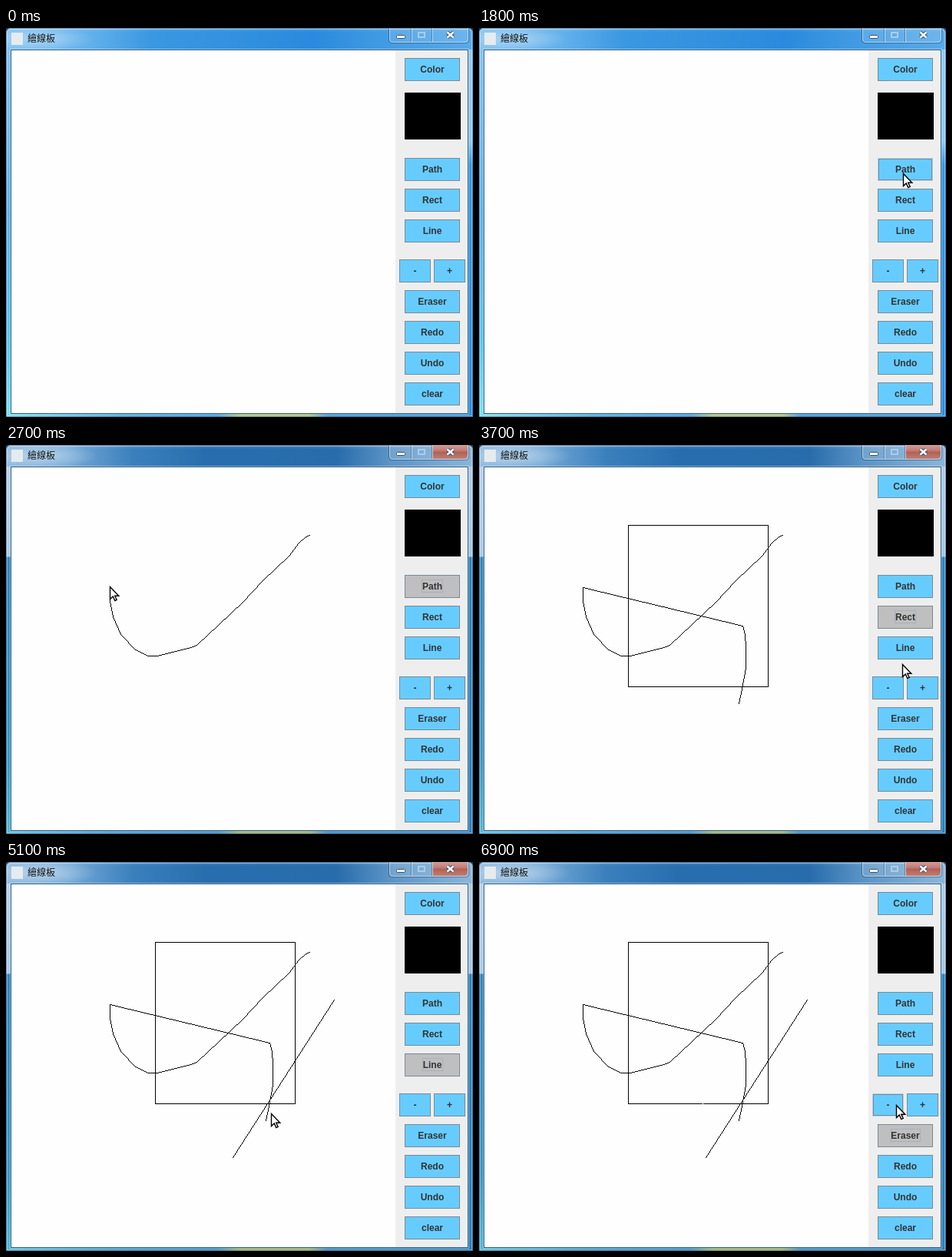
Write an HTML page with a canvas that moves like this. It is 608 px wide and 506 px high and loops after 7000 ms.

```html
<!DOCTYPE html>
<html lang="zh-Hant">
<head>
<meta charset="utf-8">
<title>Drawing board</title>
<style>
html, body { margin: 0; width: 100%; height: 100%; overflow: hidden; background: #16324d; }
#win { position: absolute; left: 0; top: 0; width: 608px; height: 506px; overflow: hidden; border-radius: 6px 6px 0 0; }
#win div { position: absolute; }
.title { left: 0; top: 0; width: 608px; height: 28px;
  background: radial-gradient(ellipse 70px 16px at 45px 14px, rgba(255,255,255,.4), transparent),
    linear-gradient(rgba(255,255,255,.2), transparent 5px),
    linear-gradient(90deg, #83c3f0, #62b0eb 110px, #3a97e1 190px, #2b8add 400px, #3f99e2 480px, #58aaea); }
.left { left: 0; top: 28px; width: 6px; height: 478px;
  background: linear-gradient(#7fc3f0, #5cb3ec 45%, #56c8ee 80%, #78e2f2); }
.right { left: 602px; top: 28px; width: 6px; height: 478px;
  background: linear-gradient(#8fcaf3, #8ac8f3 120px, #3397e2 150px, #2a8ee0); }
.foot { left: 0; top: 502px; width: 608px; height: 4px;
  background: linear-gradient(90deg, #74ddf0, #3aa5e2 150px, #2f97dd 275px, #a3bd73 305px, #a3bd73 395px, #2c8fd8 418px, #2c8fd8); }
.on .title {
  background: radial-gradient(ellipse 75px 17px at 45px 14px, rgba(255,255,255,.45), transparent),
    linear-gradient(rgba(255,255,255,.2), transparent 5px),
    linear-gradient(90deg, #8db9df, #76aad7 80px, #3b80bd 165px, #286eae 260px, #286cab 430px, #5b94c6 500px, #8bb6da); }
.on .left { background: linear-gradient(#b5d3ec, #a5cbe8 117px, #2f86c0 118px, #3797c8 80%, #50b9d6); }
.on .right { background: linear-gradient(#a9cce9, #9fc6e6 117px, #2d83bf 118px, #2b7fbd); }
.on .foot { background: linear-gradient(90deg, #50b9d6, #3291c4 150px, #2b82bd 275px, #8fa866 305px, #8fa866 395px, #2a7cb8 418px, #2a7cb8); }
svg, canvas { position: absolute; left: 0; top: 0; }
text { font: bold 12px "Liberation Sans", Arial, sans-serif; fill: #333; text-anchor: middle; }
.name { font: 12px "Noto Sans CJK TC", "Noto Sans CJK", sans-serif; fill: #111; text-anchor: start; }
.crisp { shape-rendering: crispEdges; }
.edge { fill: none; stroke: rgba(20,55,90,.4); }
.shine { fill: none; stroke: rgba(255,255,255,.4); }
.face { fill: #66ccff; stroke: #7a8a99; }
.inner, .focus { fill: none; visibility: hidden; }
.inner { stroke: #7a8a99; }
.focus { stroke: #a9b0bb; }
.hover .face { stroke: #b8cfe5; }
.hover .inner, .picked .focus { visibility: visible; }
.picked .face { fill: #bfbfbf; }
.cap { fill: rgba(255,255,255,.13); stroke: rgba(225,243,255,.65); }
.rim { fill: none; stroke: rgba(20,50,80,.45); }
.close { fill: none; }
.on .close { fill: url(#red); }
</style>
</head>
<body>
<div id="win">
  <div class="title"></div><div class="left"></div><div class="right"></div><div class="foot"></div>
  <svg width="608" height="506" viewBox="0 0 608 506">
    <linearGradient id="red" x2="0" y2="1">
      <stop stop-color="#c98f8a"/><stop offset=".45" stop-color="#b9625a"/>
      <stop offset=".5" stop-color="#a5473f"/><stop offset="1" stop-color="#bb6a58"/>
    </linearGradient>
    <path class="edge" d="M.5 506V6.5Q.5 .5 6.5 .5H601.5Q607.5 .5 607.5 6.5V505.5H0"/>
    <path class="shine" d="M1.5 504.5V7Q1.5 1.5 7 1.5H601Q606.5 1.5 606.5 7V504.5Z"/>
    <rect class="shine crisp" x="5.5" y="27.5" width="597" height="475"/>
    <rect x="7" y="6" width="15" height="16" fill="#e6ebee"/>
    <text class="name" x="28" y="18">繪線板</text>
    <path class="close" d="M555 0H601V14Q601 18 597 18H555Z"/>
    <path class="rim" d="M498.5 0V15Q498.5 19.5 503 19.5H598Q602.5 19.5 602.5 15V0M527.5 0V18M554.5 0V18"/>
    <path class="cap" d="M499.5 0V14Q499.5 18.5 503.5 18.5H597Q601.5 18.5 601.5 14V0M528.5 0V18M555.5 0V18"/>
    <rect x="508.5" y="9.5" width="11" height="4" rx="1" fill="#fff" stroke="#39536c"/>
    <path d="M537 6H545V12H537Z" fill="none" stroke="#a9cdea" stroke-width="2"/>
    <path d="M574.5 5.5L582.5 12.5M582.5 5.5L574.5 12.5" stroke="#39536c" stroke-width="4.5"/>
    <path d="M574.5 5.5L582.5 12.5M582.5 5.5L574.5 12.5" stroke="#fff" stroke-width="2.4"/>
    <g class="crisp">
      <rect x="6.5" y="28.5" width="595" height="473" fill="#eee" stroke="#28587f"/>
      <rect x="7" y="29" width="500" height="472" fill="#fefefe"/>
      <rect x="519" y="84" width="73" height="61"/>
    </g>
    <g id="buttons"></g>
  </svg>
  <canvas id="paper" width="608" height="506"></canvas>
  <svg width="608" height="506" viewBox="0 0 608 506">
    <path id="cursor" d="M.5 .5V16.5L4.2 13L6.8 18.6L9.2 17.5L6.7 12.2H11.8Z" fill="#fff" stroke="#000" stroke-width="1.4"/>
  </svg>
</div>
<script>
const $ = id => document.getElementById(id);
const NS = 'http://www.w3.org/2000/svg';
const LOOP = 7000, STEP = 100;
const ctx = $('paper').getContext('2d');

function add(parent, tag, attrs) {
  const el = document.createElementNS(NS, tag);
  for (const k in attrs) el.setAttribute(k, attrs[k]);
  return parent.appendChild(el);
}

function frame(parent, cls, x, y, w, h) {
  return add(parent, 'rect', { class: cls + ' crisp', x: x + .5, y: y + .5, width: w - 1, height: h - 1 });
}

function button(label, y, x = 519, w = 72) {
  const g = add($('buttons'), 'g', {});
  const mid = x + w / 2;
  frame(g, 'face', x, y, w, 30);
  frame(g, 'inner', x + 1, y + 1, w - 2, 28);
  const text = add(g, 'text', { x: mid, y: y + 19 });
  text.textContent = label;
  const tw = Math.round(text.getComputedTextLength()) + 2;
  frame(g, 'focus', Math.round(mid - tw / 2), y + 6, tw, 17);
  return { g, label, x, y, w };
}

const buttons = [
  button('Color', 39), button('Path', 169), button('Rect', 209), button('Line', 249),
  button('-', 301, 512, 41), button('+', 301, 557, 41),
  button('Eraser', 341), button('Redo', 381), button('Undo', 421), button('clear', 461)
];

// One-pixel polyline without smoothing, as a list of dots
function trace(points) {
  const dots = [];
  for (let i = 1; i < points.length; i++) {
    const [x, y] = points[i - 1], [u, v] = points[i];
    const n = Math.max(Math.abs(u - x), Math.abs(v - y));
    for (let k = 0; k <= n; k++) {
      const f = n ? k / n : 0;
      dots.push([Math.round(x + (u - x) * f), Math.round(y + (v - y) * f)]);
    }
  }
  return dots;
}

const plot = dots => dots.forEach(([x, y]) => ctx.fillRect(x, y, 1, 1));

const curve = trace([
  [395, 117], [390, 119], [381, 127], [368, 144], [352, 159], [333, 177], [308, 204], [277, 233],
  [248, 260], [240, 263], [197, 274], [185, 274], [168, 266], [149, 246], [139, 223], [135, 203], [135, 185]
]);
const tail = trace([[135, 185], [343, 235], [346, 247], [347, 262], [347, 290], [342, 317], [338, 336]]);

// Pointer stops: time, x, y
const stops = [
  [900, 410, 490], [1300, 495, 320], [1700, 552, 189], [1900, 552, 189], [2300, 395, 117],
  [2700, 135, 184], [3000, 540, 184], [3200, 343, 235], [3300, 338, 336], [3400, 552, 226],
  [3500, 194, 104], [3600, 376, 314], [3700, 551, 285], [3800, 552, 266], [4000, 490, 300],
  [4300, 295, 384], [4400, 320, 345], [4500, 320, 345], [4900, 427, 179], [5100, 345, 327],
  [5500, 552, 358], [5700, 552, 358], [6000, 368, 281], [6200, 292, 298], [6500, 289, 396],
  [6900, 543, 316], [7000, 543, 316]
];
const picks = [[1900, 'Path'], [3400, 'Rect'], [3800, 'Line'], [5600, 'Eraser']];

const part = (t, a, b) => Math.max(0, Math.min(1, (t - a) / (b - a)));
const drawn = t => Math.round(curve.length * part(t, 2300, 2700));

function pointer(t) {
  if (t > 2300 && t < 2700) return curve[drawn(t) - 1];
  const i = Math.max(1, stops.findIndex(s => s[0] >= t));
  const [a, x, y] = stops[i - 1], [b, u, v] = stops[i];
  const k = part(t, a, b);
  return [Math.round(x + (u - x) * k), Math.round(y + (v - y) * k)];
}

function paint(t, tip) {
  ctx.clearRect(0, 0, 608, 506);
  plot(curve.slice(0, drawn(t)));
  if (t >= 3300) plot(tail);
  if (t >= 3600) ctx.strokeRect(194.5, 104.5, 182, 210);
  if (t > 4300) plot(trace([[295, 384], t < 4900 ? tip : [427, 179]]));
  if (t >= 6300) ctx.clearRect(291, 314, 1, 1);
}

function draw(t) {
  const [x, y] = pointer(t);
  const pick = picks.filter(p => p[0] <= t).pop();
  $('win').classList.toggle('on', t >= 1900);
  $('cursor').style.visibility = t >= 900 ? 'visible' : 'hidden';
  $('cursor').setAttribute('transform', `translate(${x} ${y})`);

  for (const b of buttons) {
    const picked = !!pick && pick[1] === b.label;
    const over = t >= 900 && x >= b.x && x < b.x + b.w && y >= b.y && y < b.y + 30;
    b.g.classList.toggle('picked', picked);
    b.g.classList.toggle('hover', over && !picked);
  }
  paint(t, [x, y]);
}

const start = performance.now();
let last = -1;
function tick() {
  const t = Math.floor((performance.now() - start) % LOOP / STEP) * STEP;
  if (t !== last) draw(last = t);
  requestAnimationFrame(tick);
}
tick();
</script>
</body>
</html>
```
